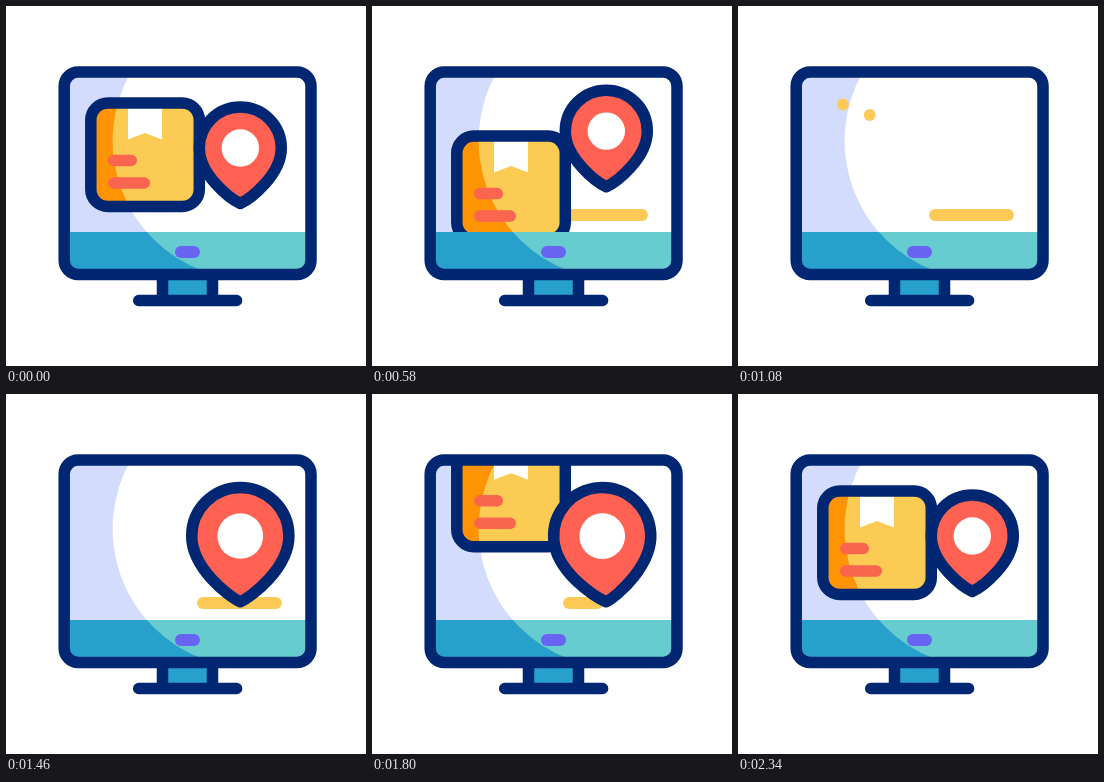
These frames come from a looping animation (360 px wide and 360 px high, 2660 ms). An HTML page:

```html
<!DOCTYPE html>
<html lang="en">
<head>
<meta charset="utf-8">
<title>Parcel tracking</title>
<style>
  html, body { margin: 0; width: 100%; height: 100%; overflow: hidden; background: #fff; }
  svg { display: block; width: 100%; height: 100%; }
  .ink { fill: none; stroke: #012672; stroke-width: 11.5; stroke-linecap: round; stroke-linejoin: round; }
  .bar { fill: none; stroke: #fdca57; stroke-width: 11.8; stroke-linecap: round; }
  .mark { stroke: #f9654f; stroke-width: 11.5; stroke-linecap: round; }
</style>
</head>
<body>
<svg viewBox="0 0 360 360">
  <defs>
    <clipPath id="view"><rect x="60" y="68" width="242" height="158"/></clipPath>
    <clipPath id="shade">
      <path d="M58 66H124.8A139 139 0 0 0 197 265H58Z"/>
    </clipPath>
    <rect id="body" x="84.8" y="97" width="108.5" height="103.5" rx="17"/>
  </defs>

  <rect x="162" y="268" width="39" height="24" fill="#28a0cc"/>
  <path class="ink" d="M156.5 270V292M206.5 270V292M132.7 294.5H230.6"/>

  <rect x="58" y="66" width="247" height="202" rx="14" fill="#fff"/>
  <rect x="58" y="66" width="247" height="202" rx="14" fill="#d3dcfd" clip-path="url(#shade)"/>

  <g clip-path="url(#view)">
    <path class="bar" id="ground"/>
    <path class="bar" id="trailA"/>
    <path class="bar" id="trailB"/>
    <use href="#body" class="parcel" fill="#fccb53"/>
    <g clip-path="url(#shade)"><use href="#body" class="parcel" fill="#fe9303"/></g>
    <g class="parcel">
      <path d="M122 100H156V133.5L139 127L122 133.5Z" fill="#fff"/>
      <path class="mark" d="M107.8 154.5H125.3M107.8 177H138.3"/>
      <use href="#body" class="ink"/>
    </g>
    <g id="pin">
      <path id="drop" class="ink" style="fill:#ff6252"/>
      <circle id="hole" fill="#fff"/>
    </g>
  </g>

  <rect x="60" y="226" width="243" height="40" fill="#67cccf"/>
  <rect x="60" y="226" width="243" height="40" fill="#28a0cc" clip-path="url(#shade)"/>
  <rect x="169" y="240" width="25" height="12" rx="6" fill="#6864f1"/>
  <rect class="ink" x="58.2" y="66" width="246.8" height="202.5" rx="14"/>
</svg>
<script>
const LOOP = 2660;
const $ = id => document.getElementById(id);
const parcels = document.querySelectorAll('.parcel');

// Each track is a list of [time, value], eased between neighbours.
const tracks = {
  parcelY: [[220, 0], [400, -12.3], [900, 140], [1559, 140], [1560, -137], [1960, 0]],
  pinY: [[460, 0], [1010, -136], [1100, -150], [1400, 0]],
  pinScale: [[1050, 1], [1051, 1.185], [2000, 1.185], [2300, 1]],
  pinTurn: [[1680, 0], [1810, -3.6], [1960, 2.5], [2080, 0]],
  groundEnd: [[220, 197], [540, 270], [1640, 270], [1920, 197]],
  tipA: [[590, 148.5], [840, 98.5]],
  tailA: [[840, 148.5], [1085, 98.5]],
  tipB: [[660, 177], [900, 109]],
  tailB: [[880, 177], [1085, 109]]
};

function at(name, t) {
  const keys = tracks[name];
  if (t <= keys[0][0]) return keys[0][1];
  for (let i = 1; i < keys.length; i++) {
    const [t0, a] = keys[i - 1], [t1, b] = keys[i];
    if (t < t1) {
      const u = (t - t0) / (t1 - t0);
      return a + (b - a) * u * u * (3 - 2 * u);
    }
  }
  return keys[keys.length - 1][1];
}

function show(el, visible, d) {
  el.setAttribute('d', visible ? d : '');
}

function dropPath(s) {
  const n = v => v * s;
  return `M0 ${n(55.5)}C${n(-10)} ${n(51)} ${n(-41)} ${n(27)} ${n(-41)} 0` +
    `A${n(41)} ${n(41)} 0 0 1 ${n(41)} 0C${n(41)} ${n(27)} ${n(10)} ${n(51)} 0 ${n(55.5)}Z`;
}

function draw(t) {
  const y = at('parcelY', t);
  parcels.forEach(p => p.setAttribute('transform', `translate(0 ${y})`));

  const s = at('pinScale', t);
  $('drop').setAttribute('d', dropPath(s));
  $('hole').setAttribute('r', 18.7 * (1 + (s - 1) * 1.2));
  $('pin').setAttribute('transform',
    `translate(234.3 ${142 + at('pinY', t)}) rotate(${at('pinTurn', t)} 0 ${55.5 * s})`);

  show($('ground'), t > 220 && t < 1920, `M197 209H${at('groundEnd', t) + 0.01}`);
  show($('trailA'), t > 590 && t < 1100, `M105 ${at('tailA', t) + 0.01}V${at('tipA', t)}`);
  show($('trailB'), t > 660 && t < 1100, `M131.7 ${at('tailB', t) + 0.01}V${at('tipB', t)}`);
}

const start = performance.now();
function tick() {
  draw((performance.now() - start) % LOOP);
  requestAnimationFrame(tick);
}
tick();
</script>
</body>
</html>
```
